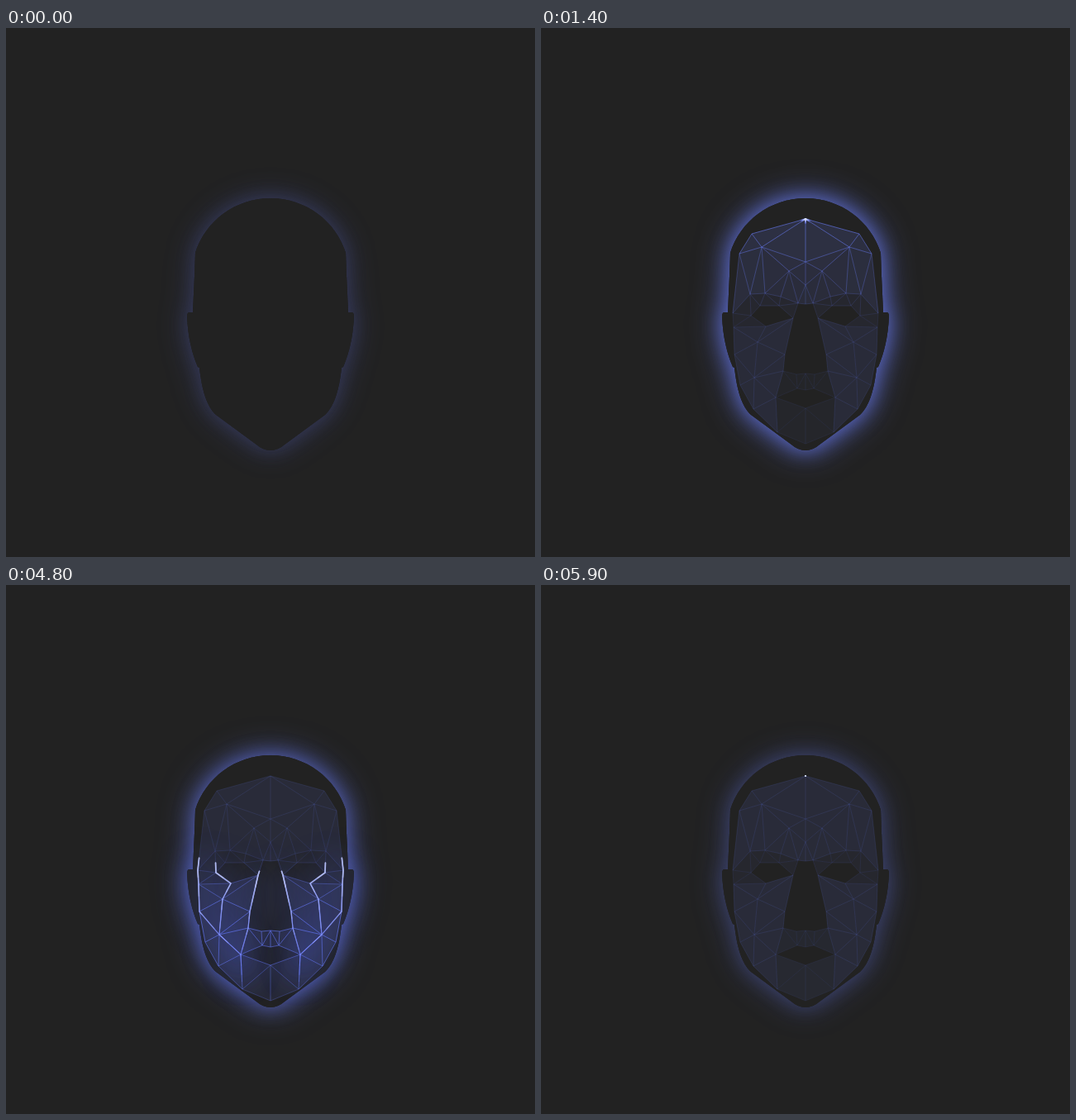
Write an HTML page with a canvas that moves like this. It is 640 px wide and 640 px high and loops after 6000 ms.

```html
<!DOCTYPE html>
<html lang="en">
<head>
<meta charset="utf-8">
<title>Face scan</title>
<style>
  html, body { margin: 0; width: 100%; height: 100%; overflow: hidden; background: #222; }
  canvas { display: block; width: 100vw; height: 100vh; }
</style>
</head>
<body>
<canvas id="stage" width="640" height="640"></canvas>
<script>
const ctx = document.getElementById('stage').getContext('2d');
const LOOP = 6000, SCAN = 2000, SECOND = 4000, STEP = 100;
const BLUE = '104,122,240';

// Left half of the mesh; the right half is its mirror about x = 320.
const V = {
  a: [320, 231], b: [255, 249], c: [240, 273], d: [267, 265], e: [320, 283],
  f: [300, 294], g: [320, 311], h: [311, 333], i: [290, 325], j: [271, 321],
  k: [253, 322], l: [232, 345], m: [320, 334], n: [254, 348], o: [265, 336],
  p: [288, 336], q: [305, 351], r: [272, 361], s: [233, 362], w: [262, 380],
  x: [295, 395], y: [234, 395], z: [258, 423], A: [293, 415], B: [241, 432],
  C: [257, 461], D: [284, 447], F: [286, 489], H: [310, 436], I: [320, 418],
  J: [309, 419], K: [320, 438], L: [320, 460], M: [320, 503]
};
const REGIONS = [
  { rest: .11, again: .11, faces: 'abd bcd ade def efg fgh ghm fhi fij dfj djk cdk ckl' },
  { rest: .06, again: .06, faces: 'kln kno kjo jop jip iph phq lns nsr' },
  { rest: .11, again: .11, faces: 'srw rqw qwx swy wyz wxz xzA yzB zBC zAD zDC DCF' },
  { rest: .04, again: .07, faces: 'ADH AHJ JHI IHK DFL FLM' }
];
const ROUTES = ['MFDzyslcba', 'MFDzwrnkjda', 'MFDAxqhfea'];

const clamp = v => Math.min(1, Math.max(0, v));
const lerp = (a, b, k) => a + (b - a) * k;
const smooth = v => { v = clamp(v); return v * v * (3 - 2 * v); };
const cubic = v => { v = clamp(v); return v < .5 ? 4 * v ** 3 : 1 - 4 * (1 - v) ** 3; };
const mirror = ([x, y]) => [640 - x, y];
const points = word => [...word].map(ch => V[ch]);
const meanY = pts => pts.reduce((sum, p) => sum + p[1], 0) / pts.length;

function trace(pts, closed) {
  const path = new Path2D();
  pts.forEach(p => path.lineTo(...p));
  if (closed) path.closePath();
  return path;
}

const faces = [], edges = new Map();
for (const region of REGIONS) {
  for (const word of region.faces.split(' ')) {
    const left = points(word);
    for (const pts of [left, left.map(mirror)]) {
      faces.push({ region, y: meanY(pts), path: trace(pts, true) });
      pts.forEach((p, n) => {
        const pair = [p, pts[(n + 1) % 3]];
        const key = pair.map(String).sort().join(' ');
        if (!edges.has(key)) edges.set(key, { region, y: meanY(pair), path: trace(pair) });
      });
    }
  }
}

const trails = ROUTES.flatMap(word => {
  const left = points(word);
  const length = left.slice(1).reduce((sum, p, n) =>
    sum + Math.hypot(p[0] - left[n][0], p[1] - left[n][1]), 0);
  return [left, left.map(mirror)].map(pts => ({ length, path: trace(pts) }));
});

const half = new Path2D('M320 206C277 206 241 234 229 272L228 300L226 344H222' +
  'Q219 344 219 349C220 373 225 394 232 410L234 411C237 438 243 458 254 468' +
  'L303 504Q311 511 320 511Z');
const head = new Path2D(half);
head.addPath(half, new DOMMatrix([-1, 0, 0, 1, 640, 0]));

function glowLevel(u, base) {
  return u < 1100
    ? lerp(base, .82, clamp((u - 50) / 1050) ** 1.8)
    : lerp(.82, .25, smooth((u - 1100) / 900));
}

function drawHead(level) {
  ctx.save();
  ctx.fillStyle = '#222';
  ctx.shadowColor = `rgba(${BLUE},${level})`;
  for (const blur of [40, 24]) {
    ctx.shadowBlur = blur;
    ctx.fill(head);
  }
  ctx.restore();
  ctx.fillStyle = '#222';
  ctx.fill(head);
  ctx.fillRect(319, 207, 2, 303);
}

// The wave reaches lower parts of the face first.
function wave(y, u) {
  const since = u - 250 - (503 - y) * 3;
  const rise = smooth(since / 250);
  return { rise, flash: rise * (1 - smooth((since - 250) / 480)) };
}

function drawMesh(u, second) {
  for (const { region, y, path } of faces) {
    const { rise, flash } = wave(y, u);
    const rest = second ? lerp(region.rest, region.again, rise) : region.rest * rise;
    ctx.fillStyle = `rgba(${BLUE},${rest + .06 * flash})`;
    ctx.fill(path);
  }
  ctx.lineWidth = 1;
  for (const { region, y, path } of edges.values()) {
    const { rise, flash } = wave(y, u);
    const rest = (.05 + region.rest * .8) * (second ? 1 : rise);
    ctx.strokeStyle = `rgba(${BLUE},${rest + .55 * flash})`;
    ctx.stroke(path);
  }
}

function dash(trail, from, to) {
  ctx.setLineDash([Math.max(.01, (to - from) * trail.length), 2000]);
  ctx.lineDashOffset = -from * trail.length;
  ctx.stroke(trail.path);
}

function drawTrails(u) {
  if (u < 100 || u >= SCAN) return;
  const front = cubic((u - 270) / 1000);
  const back = cubic((u - 400) / 1200);
  const span = front - back;
  ctx.save();
  ctx.lineJoin = 'round';

  // Only the blurred shadow of these strokes lands on the stage.
  ctx.save();
  ctx.translate(-1000, 0);
  ctx.shadowOffsetX = 1000;
  ctx.shadowBlur = 42;
  ctx.shadowColor = `rgba(80,102,255,${.36 * clamp(span * 6)})`;
  ctx.strokeStyle = '#fff';
  ctx.lineWidth = 12;
  if (span > .005) trails.forEach(t => dash(t, back, front));
  ctx.restore();

  ctx.lineCap = 'round';
  const layers = 7;
  for (let n = 0; n < layers; n++) {
    const k = n / layers;
    ctx.lineWidth = lerp(1, 2, k);
    ctx.strokeStyle = `rgba(${lerp(110, 235, k)},${lerp(128, 240, k)},255,.3)`;
    trails.forEach(t => dash(t, lerp(back, front, k), front));
  }
  ctx.restore();
}

function draw(now) {
  const t = Math.floor(now % LOOP / STEP) * STEP;
  const second = t >= SECOND;
  const u = second ? t - SECOND : Math.min(t, SCAN);
  ctx.fillStyle = '#222';
  ctx.fillRect(0, 0, 640, 640);
  drawHead(glowLevel(u, second ? .25 : .2));
  drawMesh(u, second);
  drawTrails(u);
}

const start = performance.now();
function tick() {
  draw(performance.now() - start);
  requestAnimationFrame(tick);
}
tick();
</script>
</body>
</html>
```
